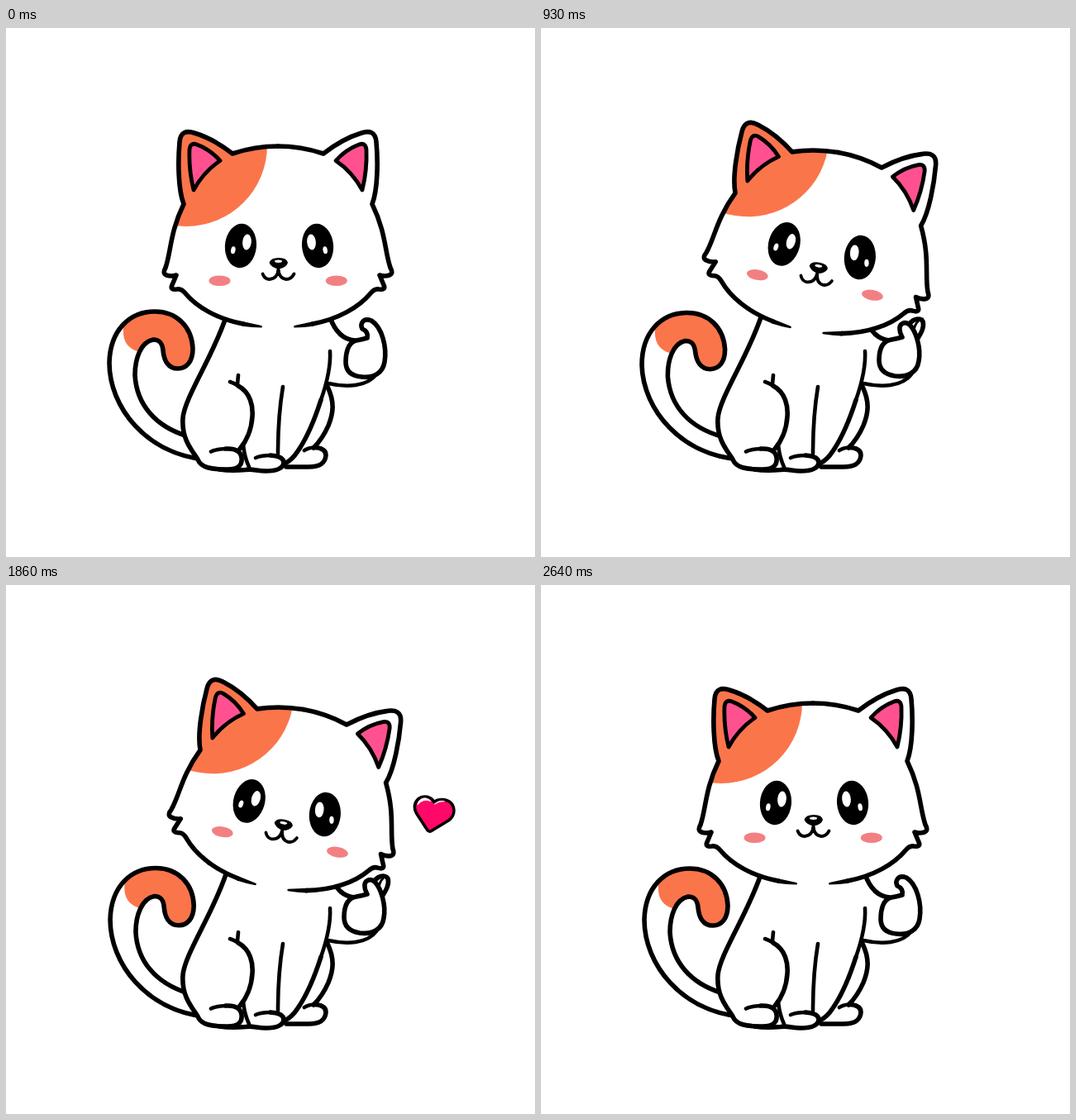
Write an HTML page that moves like this. It is 640 px wide and 640 px high and loops after 2780 ms.

```html
<!DOCTYPE html>
<html lang="en">
<head>
<meta charset="utf-8">
<title>Cat with a heart</title>
<style>
html, body { margin: 0; width: 100%; height: 100%; overflow: hidden; background: #fff; }
svg { display: block; width: 100vw; height: 100vh; }
.line { fill: none; stroke: #000; stroke-width: 5.6; stroke-linecap: round; stroke-linejoin: round; }
.thin { stroke-width: 4.6; }
.white { fill: #fff; }
.orange { fill: #fb754b; }
</style>
</head>
<body>
<svg viewBox="0 0 640 640">
  <defs>
    <path id="tailShape" d="M240 522C170 515 125 459 125 405C126 365 150 343 180 343C207 343 225 362 226 388C226 404 218 412 208 412C196 412 191 402 190 390C189 380 185 377 178 377C163 380 156 400 156 420C158 455 180 482 220 494"/>
    <path id="headFill" d="M329 361H309L287 358C256 352 231 338 217 321Q212 315 207 316Q198 317 201 311L206 299Q200 301 194 299Q189 297 193 290C200 270 198 248 215 213C208 195 208 160 210 138C211 125 219 124 228 127Q251 134 274 152Q301 143 330 143V361Z"/>
    <path id="headLine" d="M287 358C256 352 231 338 217 321Q212 315 207 316Q198 317 201 311L206 299Q200 301 194 299Q189 297 193 290C200 270 198 248 215 213C208 195 208 160 210 138C211 125 219 124 228 127Q251 134 274 152Q301 143 329 143"/>
    <g id="headEdge">
      <use href="#headLine" class="line"/>
      <path d="M286 355L309 360Q311 361.5 309 362.5Q297 362.5 286 360.8Z"/>
      <path class="line" style="fill:#ff5190;stroke-width:4.8" d="M227 196Q221 172 222 147Q223 138 231 141Q247 147 259 160.500Q239 174 227 196Z"/>
    </g>
    <g id="faceHalf">
      <ellipse cx="284" cy="263.500" rx="19" ry="26.800" transform="rotate(5 284 263)"/>
      <ellipse class="white" cx="291.500" cy="259" rx="5.300" ry="9.500" transform="rotate(5 291 259)"/>
      <ellipse class="white" cx="274.800" cy="268.800" rx="2.700" ry="4.600" transform="rotate(10 275 269)"/>
    </g>
    <clipPath id="tailClip"><use href="#tailShape"/></clipPath>
    <clipPath id="headClip"><use href="#headFill"/></clipPath>
  </defs>

  <rect class="white" width="640" height="640"/>

  <g id="tail">
    <use href="#tailShape" class="white"/>
    <path class="orange" clip-path="url(#tailClip)" d="M143 356Q137 386 162 392L240 430V330H150Z"/>
    <use href="#tailShape" class="line"/>
  </g>

  <g id="body">
    <path class="white" d="M265 350C250 395 216 447 214 470C211 500 228 516 232 522L250 534H330L345 526C378 490 392 430 392 391L394 350Z"/>
    <g class="line">
      <path d="M266 350C250 398 216 447 214 472C212 500 228 514 232 522C236 532 248 534 268 534C282 534 286 528 285 520C284 511 276 508.500 266 509"/>
      <path class="thin" d="M266 509Q254 509.500 248 512.500M271 428Q277 430 281 433M281 420L280 431"/>
      <path d="M281 433C296 441 299 458 298 470C297 487 290 501 283 509"/>
      <path class="thin" d="M287 503Q288 518 294 531M335 434Q329 470 329 515"/>
      <path class="thin" d="M302 520Q309 517 320 517"/>
      <path d="M320 517Q336 518 336 526C335 534 325 536 314 536C304 536 298 533 290 534.500Q272 536 258 534"/>
      <path class="thin" d="M392 391C393 408 388 430 381 450"/>
      <path d="M381 450C374 472 364 496 353 512Q346 523 337 527"/>
      <path d="M389 434C398 453 396 466 390 481Q383 497 372 508"/>
      <path class="thin" d="M361 511Q365 508 373 507.500"/>
      <path d="M373 507.500Q387 508 387 517C386 528 378 531 366 531H339"/>
      <path d="M392 350C398 367 408 377 422 378"/>
      <path class="thin" d="M390 430C412 435 437 434 448 419"/>
    </g>
  </g>

  <g id="head">
    <use href="#headFill" class="white"/>
    <use href="#headFill" class="white" transform="translate(658) scale(-1 1)"/>
    <circle class="orange" cx="218" cy="142" r="98" clip-path="url(#headClip)"/>
    <use href="#headEdge"/>
    <use href="#headEdge" transform="translate(658) scale(-1 1)"/>
    <use href="#faceHalf"/>
    <use href="#faceHalf" transform="translate(661) scale(-1 1)"/>
    <g fill="#f28082">
      <ellipse cx="258.500" cy="305.800" rx="13" ry="6.300"/>
      <ellipse cx="399.800" cy="305.800" rx="13" ry="6.300"/>
    </g>
    <path d="M318.500 284Q320 278 330 278Q340 278 341 284Q339 290 330 291.500Q321 290 318.500 284Z"/>
    <ellipse class="white" cx="329.500" cy="282.300" rx="4.500" ry="1.700"/>
    <path class="line" style="stroke-width:3.800" d="M310.500 297.500Q313 304 319 304Q329 303 329.500 291Q330 303 339 304Q345 304 348.500 297.500"/>
  </g>

  <g id="heart">
    <path class="line" style="fill:#ff0868;stroke-width:4.800" d="M526 246C521 237 509 235 501 241C494 247 493 257 498 265L515 291Q518 295.500 522 293L550 276C558 270 560 261 557 253C552 242 536 239 526 246Z"/>
    <path d="M499.500 251C501 240 514 236 521 245Q508 240 499.500 251ZM527 250Q533 243 543 245Q534 245 527 250Z" fill="#fff" stroke="#fff" stroke-width="1"/>
  </g>

  <g id="finger" class="line">
    <path style="fill:#fff" d="M444 362C448 351 459 350 462 355C464 362 460 369 455 377"/>
    <path style="stroke-width:3" d="M456 355Q452 359 451 366"/>
  </g>
  <path id="hand" class="line" style="fill:#fff"/>
</svg>
<script>
const LOOP = 2780, STEPS = 37, STEP = 2640 / STEPS;
const el = id => document.getElementById(id);
const [tail, head, finger, hand, heart] = ['tail', 'head', 'finger', 'hand', 'heart'].map(el);
const ramp = (t, a, b) => Math.max(0, Math.min(1, (t - a) / (b - a)));
const ease = u => (1 - Math.cos(Math.PI * u)) / 2;

const thumbUp = 'M437 375Q430 377 424 378C413 380 411 395 411 404C411 416 419 421 430 422C445 424 456 417 458 404C461 386 455 362 442 354C432 350 428 358 431 364C436 366 438 370 437 375';
const fingers = 'M437 374Q430 376 424 377C411 379 409 392 409 402C409 413 416 419 428 421C443 423 455 417 457 403C460 388 454 367 446 359C440 354 433 358 434 365C434 369 436 372 437 374';

function blend(a, b, u) {
  const to = b.match(/\d+/g);
  let i = 0;
  return a.replace(/\d+/g, n => (+n + (to[i++] - n) * u).toFixed(2));
}

const sway = [[0, 0], [400, 1.5], [1190, -2.5], [2035, 0.9], [2640, 0]];
function swayAt(t) {
  let i = 0;
  while (i < sway.length - 2 && t > sway[i + 1][0]) i++;
  const [t0, a] = sway[i], [t1, b] = sway[i + 1];
  return a + (b - a) * ease(ramp(t, t0, t1));
}

function draw(t) {
  tail.setAttribute('transform', `rotate(${swayAt(t)} 235 520)`);

  const u = t < 1200 ? ramp(t, 355, 705) : 1 - ramp(t, 1865, 2205);
  const lift = -2.5 * Math.sin(Math.PI * u);
  head.setAttribute('transform', `translate(0 ${lift}) rotate(${10 * ease(u)} 301 321)`);

  const pose = ease(t < 1200 ? ramp(t, 290, 500) : 1 - ramp(t, 2290, 2500));
  hand.setAttribute('d', blend(thumbUp, fingers, pose));
  finger.setAttribute('transform', `translate(452 382) scale(${pose}) translate(-452 -382)`);
  finger.style.display = pose > 0.02 ? '' : 'none';

  // the heart rises on a decelerating path while growing evenly
  const size = (t - 800) / 1410;
  const left = (2450 - t) ** 2;
  const x = 528.5 - 2.95e-5 * left, y = 263.3 + 3.84e-5 * left;
  const shown = t > 860 && t < 2400;
  heart.style.display = shown ? '' : 'none';
  if (shown) {
    heart.setAttribute('transform', `translate(${x} ${y}) scale(${size}) translate(-526.5 -265.5)`);
    heart.setAttribute('opacity', 1 - ramp(t, 2180, 2400));
  }
}

const start = performance.now();
function tick() {
  const t = (performance.now() - start) % LOOP;
  draw(Math.min(STEPS, Math.floor((t + 4) / STEP)) * STEP);
  requestAnimationFrame(tick);
}
tick();
</script>
</body>
</html>
```
